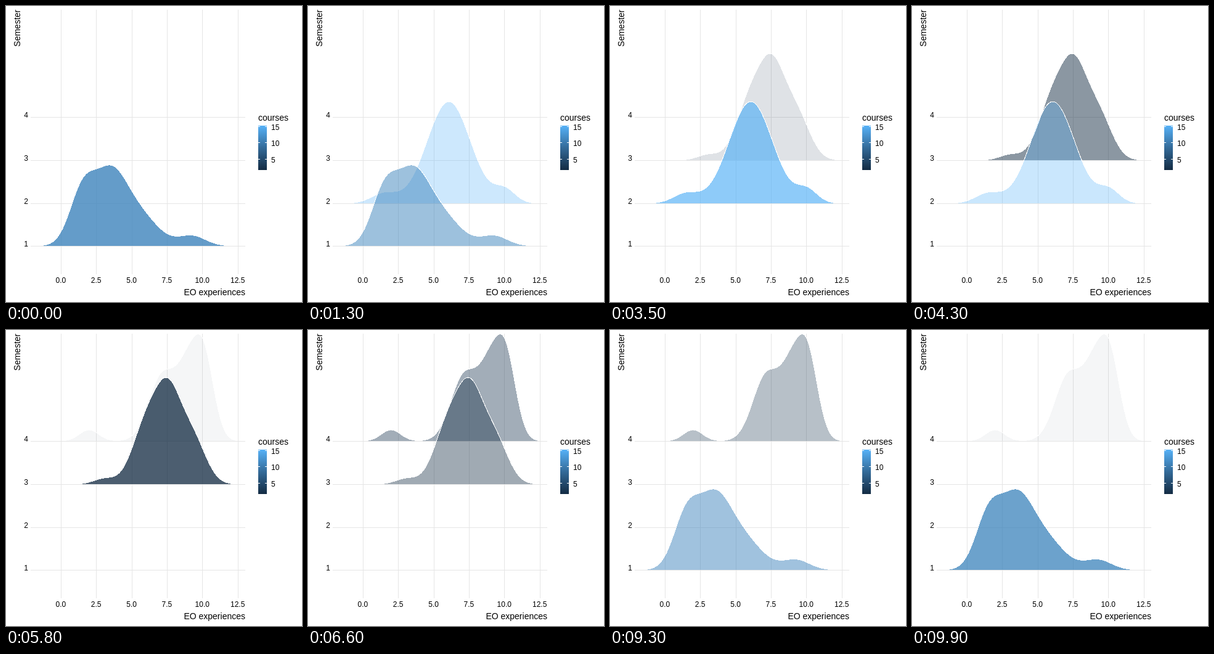
Animation, 480 px wide and 480 px high, one loop 10000 ms. Source, as an HTML page:

```html
<!DOCTYPE html>
<html lang="en">
<head>
<meta charset="utf-8">
<title>EO experiences by semester</title>
<style>
  html, body { margin: 0; width: 100%; height: 100%; overflow: hidden; background: #fff; }
  svg { display: block; width: 480px; height: 480px; }
  text { font: 12px "Liberation Sans", Arial, sans-serif; fill: #000; }
  .title { font-size: 14px; }
  .mid { text-anchor: middle; }
  .end { text-anchor: end; }
  .grid { fill: #e5e5e5; }
  .ridge, .tick { shape-rendering: crispEdges; }
  .line { fill: none; stroke: #fff; stroke-width: 1; }
  .tick { fill: #fff; }
</style>
</head>
<body>
<svg id="chart" viewBox="0 0 480 480">
  <defs>
    <linearGradient id="bar" x1="0" y1="0" x2="0" y2="1">
      <stop offset="0" stop-color="#56b1f7"/>
      <stop offset=".5" stop-color="#336a98"/>
      <stop offset="1" stop-color="#132b43"/>
    </linearGradient>
  </defs>
  <g id="axes"></g>
  <g id="ridges"></g>
  <text class="title end" x="388" y="469">EO experiences</text>
  <text class="title end" transform="translate(23 6) rotate(-90)">Semester</text>
  <text class="title" x="409" y="186">courses</text>
  <rect x="409" y="194" width="14" height="72" fill="url(#bar)"/>
  <g id="legend"></g>
</svg>
<script>
const ALPHA = 0.8, STATE = 2500, TICK = 100;
const xAt = v => 88.8 + 22.95 * v;
const yAt = s => Math.round(389.4 - 69.75 * (s - 1));

// Each density is a sum of bells: [height in px, mean, deviation].
const semesters = [
  { color: '#3e84bc', bells: [[86, 1.53, 0.92], [97, 3.45, 1.1], [55, 5.3, 1.45], [16, 9.3, 0.95]] },
  { color: '#56b1f7', bells: [[16, 1.5, 0.9], [165, 6.08, 1.55], [21, 10.05, 0.75]] },
  { color: '#132b43', bells: [[9, 3.08, 0.75], [95, 6.06, 1], [132, 7.65, 0.91], [69, 9.36, 0.92]] },
  { color: '#18344f', bells: [[18, 2, 0.68], [106, 7.18, 0.96], [100, 8.97, 0.77], [127, 10.13, 0.72]] }
];

function add(parent, tag, attrs, text) {
  const el = document.createElementNS('http://www.w3.org/2000/svg', tag);
  for (const k in attrs) el.setAttribute(k, attrs[k]);
  if (text) el.textContent = text;
  return parent.appendChild(el);
}

const density = (bells, v) =>
  bells.reduce((sum, [h, mean, sd]) => sum + h * Math.exp(-(((v - mean) / sd) ** 2) / 2), 0);

// Runs of curve points, cut where the density is close to zero.
function runs(bells, base) {
  const list = [];
  let run = null;
  for (let v = -2; v < 13; v += 0.05) {
    const h = density(bells, v);
    if (h < 1) { run = null; continue; }
    if (!run) list.push(run = []);
    run.push([xAt(v).toFixed(2), (base - h).toFixed(2)]);
  }
  return list;
}

const axes = document.getElementById('axes');
for (let s = 1; s <= 4; s++) {
  add(axes, 'rect', { class: 'grid', x: 40, y: yAt(s), width: 348, height: 1 });
  add(axes, 'text', { class: 'end', x: 36, y: yAt(s) + 1 }, String(s));
}
for (let v = 0; v <= 12.5; v += 2.5) {
  add(axes, 'rect', { class: 'grid', x: Math.round(xAt(v)), y: 6, width: 1, height: 429 });
  add(axes, 'text', { class: 'mid', x: xAt(v), y: 449 }, v.toFixed(1));
}

const legend = document.getElementById('legend');
for (let n = 15; n > 0; n -= 5) {
  const y = Math.round(194.6 + 5.3 * (15 - n));
  for (const x of [409, 420]) add(legend, 'rect', { class: 'tick', x, y, width: 3, height: 1 });
  add(legend, 'text', { x: 430, y: y + 6 }, String(n));
}

// Lower semesters are drawn in front.
const ridges = document.getElementById('ridges');
const groups = [];
for (let i = 3; i >= 0; i--) {
  const { color, bells } = semesters[i], base = yAt(i + 1);
  groups[i] = add(ridges, 'g', { class: 'ridge' });
  for (const run of runs(bells, base)) {
    const d = 'M' + run.join('L');
    add(groups[i], 'path', { d: `${d}V${base}H${run[0][0]}Z`, fill: color });
    add(groups[i], 'path', { d, class: 'line' });
  }
}

// Linear cross-fade shown in coarse steps; the first one is longer and coarser.
function fade(t, i) {
  const start = i ? 700 : 600, step = i ? 2 : 2.8;
  const units = (STATE - start) / TICK;
  const u = Math.floor((t - start) / TICK);
  if (u < 1) return 0;
  if (u >= units) return 1;
  return Math.round(1 + step * Math.floor((u - 0.5) / step)) / units;
}

function draw() {
  const t = performance.now() % (4 * STATE);
  const now = Math.floor(t / STATE), next = (now + 1) % 4;
  const p = fade(t % STATE, now);
  groups.forEach((g, i) => {
    const w = i === now ? 1 - p : i === next ? p : 0;
    g.setAttribute('visibility', w > 0 ? 'visible' : 'hidden');
    g.setAttribute('fill-opacity', ALPHA * w);
  });
  requestAnimationFrame(draw);
}
draw();
</script>
</body>
</html>
```
